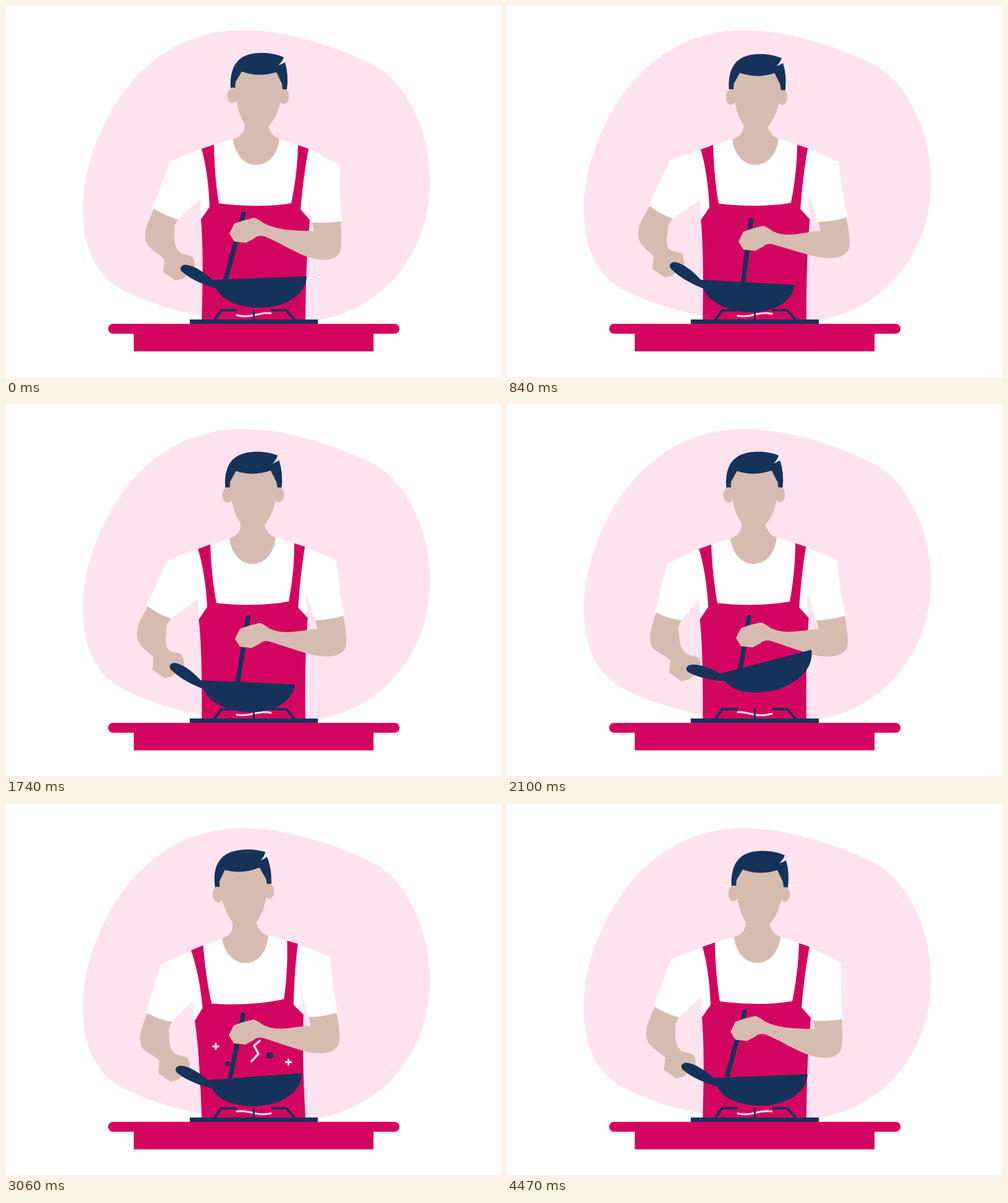
Animation of 800 by 600 pixels, one loop 4.5 s. Source, as an HTML page with a canvas:

```html
<!DOCTYPE html>
<html lang="en">
<head>
<meta charset="utf-8">
<title>Cooking</title>
<style>
  html, body { margin: 0; width: 100%; height: 100%; overflow: hidden; background: #fff; }
  canvas { display: block; }
</style>
</head>
<body>
<canvas id="stage" width="800" height="600"></canvas>
<script>
const ctx = document.getElementById('stage').getContext('2d');
const LOOP = 4500;
const BLUSH = '#ffe3ee', PINK = '#d3045f', NAVY = '#15325b', SKIN = '#d6bcb0', WHITE = '#fff';

// time, lean, headY, leftSleeve, panX, panY, panTilt, rightSleeve, handX, handY
const POSES = [
  [0, 0, 0, 0, 0, 0, 0, 0, 0, 0],
  [840, -.6, 2, 6.3, -19, -5, 5.4, -6.5, 13, 13],
  [1080, -.9, 1, 6.5, -19, -4, 5, -9, 17, 15],
  [1350, -1.15, -.3, 2.8, -8, -1, 1.5, -5.7, 9, 9],
  [1710, -1.2, 0, 6, -18, -2, 5, -5.5, 9, 10],
  [2100, -1.2, 0, -4.9, 8, 3, -12.5, -5.7, 9, 9],
  [2520, -2.2, 0, 4, -16, 1, 3, -5.6, 7, 10],
  [3060, -3.55, -2, 0, -8, 5, -1.9, -2.6, -1, 6],
  [3400, -2.4, 0, 3.5, -13, 2, 2, -5.5, 7, 11],
  [3690, -1, .7, 2.6, -8, -1, 1.9, -3.8, 6, 9],
  [4000, -.6, .5, 5.5, -17, -3, 4, -3.8, 6, 8],
  [4300, -.2, 0, 2, -6, -1, 1, -2, 2, 4]
];

function key(i) {
  const n = POSES.length, turn = Math.floor(i / n);
  const row = POSES[i - turn * n];
  return [row[0] + turn * LOOP, ...row.slice(1)];
}

// Smooth curve through the poses, flat at turning points
function poseAt(t) {
  let i = POSES.length - 1;
  while (POSES[i][0] > t) i--;
  const [a, b, c, d] = [-1, 0, 1, 2].map(k => key(i + k));
  const span = c[0] - b[0], u = (t - b[0]) / span;
  const slope = (p, q, r, k) =>
    (q[k] - p[k]) * (r[k] - q[k]) <= 0 ? 0 : (r[k] - p[k]) / (r[0] - p[0]);
  return b.slice(1).map((v, j) => {
    const k = j + 1;
    return v * (1 + 2 * u) * (1 - u) ** 2 + c[k] * u * u * (3 - 2 * u) +
      span * u * (1 - u) * (slope(a, b, c, k) * (1 - u) - slope(b, c, d, k) * u);
  });
}

const rad = deg => deg * Math.PI / 180;
const clamp = v => Math.max(0, Math.min(1, v));

function turn([x, y], [cx, cy], deg) {
  const c = Math.cos(rad(deg)), s = Math.sin(rad(deg));
  return [cx + (x - cx) * c - (y - cy) * s, cy + (x - cx) * s + (y - cy) * c];
}

function fill(color, path) {
  ctx.fillStyle = color;
  ctx.fill(new Path2D(path));
}

function stroke(color, width, path) {
  ctx.strokeStyle = color;
  ctx.lineWidth = width;
  ctx.stroke(new Path2D(path));
}

function dot(color, x, y, rx, ry = rx) {
  ctx.fillStyle = color;
  ctx.beginPath();
  ctx.ellipse(x, y, rx, ry, 0, 0, 7);
  ctx.fill();
}

function rotated(x, y, deg, draw) {
  ctx.save();
  ctx.translate(x, y);
  ctx.rotate(rad(deg));
  ctx.translate(-x, -y);
  draw();
  ctx.restore();
}

function drawHead(y, tilt) {
  ctx.save();
  ctx.translate(0, y);
  rotated(404, 195, tilt, () => {
    dot(SKIN, 366, 145, 8.5, 12);
    dot(SKIN, 449, 146, 8.5, 12.5);
    fill(SKIN, 'M370 100H447V135C445 160 436 182 424 195C412 205 398 205 386 191C378 180 372 160 370 135Z');
    fill(NAVY, 'M363 133C361 98 375 77 408 76C423 75 438 78 449 83Q446 91 440 96Q446 94 451 91Q457 111 454 135L447 134.500 446 126 437 107Q408 116 381 106L371 123 370 133Q366 131 363 133Z');
  });
  ctx.restore();
}

function drawParticles(t) {
  const size = t < 2900 ? clamp((t - 2250) / 450) : clamp(1 - (t - 3100) / 760);
  if (!size) return;
  const drift = (t - 3060) / 630;
  for (const [x, y, dx, dy] of [[339, 392, 0, -1], [456.5, 417.500, 2.500, -2.500]]) {
    const r = 5.5 * size, px = x + dx * drift, py = y + dy * drift;
    stroke(BLUSH, 3 * size, `M${px - r} ${py}h${2 * r}M${px} ${py - r}v${2 * r}`);
  }
  dot(NAVY, 358 - 2 * drift, 420 - 2 * drift, 4 * size);
  dot(NAVY, 426.5 + 2.5 * drift, 406.5 - 4 * drift, 5.5 * size);
  stroke(BLUSH, 3.5 * size, `M411 ${382 - drift}L401 ${391 - 2 * drift} 408 ${404 - 2 * drift} 396 ${417 - 4 * drift}`);
}

function draw(t) {
  const [lean, headY, sleeveL, panX, panY, panTilt, sleeveR, handX, handY] = poseAt(t);
  const HIP = [400, 508];
  const limb = (pivot, deg) => (x, y) => turn(turn([x, y], pivot, deg), HIP, lean).join(' ');
  const body = limb(HIP, 0), left = limb([295, 265], sleeveL), right = limb([505, 265], sleeveR);
  const grip = (x, y) => `${x + panX} ${y + panY}`;
  const hand = (x, y) => `${x + handX} ${y + handY}`;

  ctx.fillStyle = WHITE;
  ctx.fillRect(0, 0, 800, 600);
  ctx.lineCap = 'butt';
  fill(BLUSH, 'M385 39C450 39 535 65 595 96C650 127 685 205 685 285C685 390 620 487 505 508L340 505C280 496 235 481 196 463C140 437 124 385 124 327C124 250 165 160 215 110C265 60 320 39 385 39Z');

  // Torso and head
  fill(WHITE, `M${body(316, 231)}L${left(265, 251)} ${left(237, 327)}Q${left(256, 339)} ${left(278, 345)}L${body(314, 312)} ${body(345, 270)}Z`);
  fill(WHITE, `M${body(489, 231)}L${right(540, 257)}Q${right(538, 300)} ${right(543, 348)}Q${right(520, 352)} ${right(494, 350)}L${body(489, 304)} ${body(460, 270)}Z`);
  rotated(...HIP, lean, () => {
    fill(WHITE, 'M367 215L316 231 314 312 315 345H491L489 304V231L442 215Z');
    fill(SKIN, 'M386 180V193C385 206 378 212 367 215C370 240 385 257 404 257C424 257 439 240 442 215C433 212 427 205 424 193V180Z');
    drawHead(headY, lean * .45);
    fill(PINK, 'M316 231L336 224C337 265 340 295 344 319C380 324 425 325 461 319C467 290 471 260 472 225L489 231C483 262 479 295 476 329L491 346C486 400 484 450 484 525H316C318 450 319 390 315 345L329 325C328 290 323 255 316 231Z');
  });

  drawParticles(t);

  // Spoon and arms
  const tip = [385 + handX * .8 - 1, 336 + handY * .8];
  ctx.lineCap = 'round';
  rotated(...tip, 15.3 - .62 * handY, () =>
    stroke(NAVY, 7.5, `M${tip}v112`));
  fill(SKIN, `M${left(239, 328)}C${left(232, 345)} ${left(224, 358)} ${left(225, 375)}C${left(226, 391)} ${grip(245, 399)} ${grip(256, 410)}L${grip(254, 430)} ${grip(274, 444)} ${grip(286, 441)} ${grip(305, 424)}Q${grip(306, 412)} ${grip(301, 405)}L${grip(283, 400)}C${left(269, 388)} ${left(273, 374)} ${left(272, 356)}L${left(278, 345)}Q${left(256, 339)} ${left(239, 328)}Z`);
  fill(SKIN, `M${right(541, 348)}C${right(542, 366)} ${right(543, 384)} ${right(540, 396)}C${right(534, 415)} ${right(506, 412)} ${right(488, 406)}C${right(465, 398)} ${hand(433, 377)} ${hand(415, 372)}Q${hand(406, 371)} ${hand(401, 376)}L${hand(388, 383)} ${hand(369, 381)} ${hand(361, 368)} ${hand(369, 352)} ${hand(383, 347)} ${hand(401, 342.500)}Q${hand(407, 344)} ${hand(416, 351)}C${hand(440, 363)} ${right(465, 363)} ${right(497, 364)}L${right(495, 350)}Q${right(520, 352)} ${right(541, 348)}Z`);

  // Flame
  const dip = 387 + 70 * t / 900;
  let flame = '';
  for (let x = 373; x <= 428; x += 2.5) {
    flame += `${flame ? 'L' : 'M'}${x} ${499.2 + 2.5 * Math.cos((x - dip) / 70 * 2 * Math.PI)}`;
  }
  stroke(BLUSH, 3, flame);

  // Pan
  ctx.save();
  ctx.translate(panX, panY);
  rotated(283, 425, panTilt, () =>
    fill(NAVY, 'M334 443C322 432 305 420 291 418.500C282 418 279 426 286 431C300 443 323 452 340 457C349 478 380 488 412 488C455 487 485 465 486 437Z'));
  ctx.restore();

  // Stove and counter
  stroke(NAVY, 4, 'M337 507L348 492H371M466 507L453 492H430');
  stroke(NAVY, 3, 'M400.500 492V508');
  fill(NAVY, 'M297 507H504V514H297Z');
  fill(PINK, 'M173 514H628A8 8 0 0 1 628 530H594V558.500H206.500V530H173A8 8 0 0 1 173 514Z');
}

function frame() {
  draw(performance.now() % LOOP);
  requestAnimationFrame(frame);
}
frame();
</script>
</body>
</html>
```
